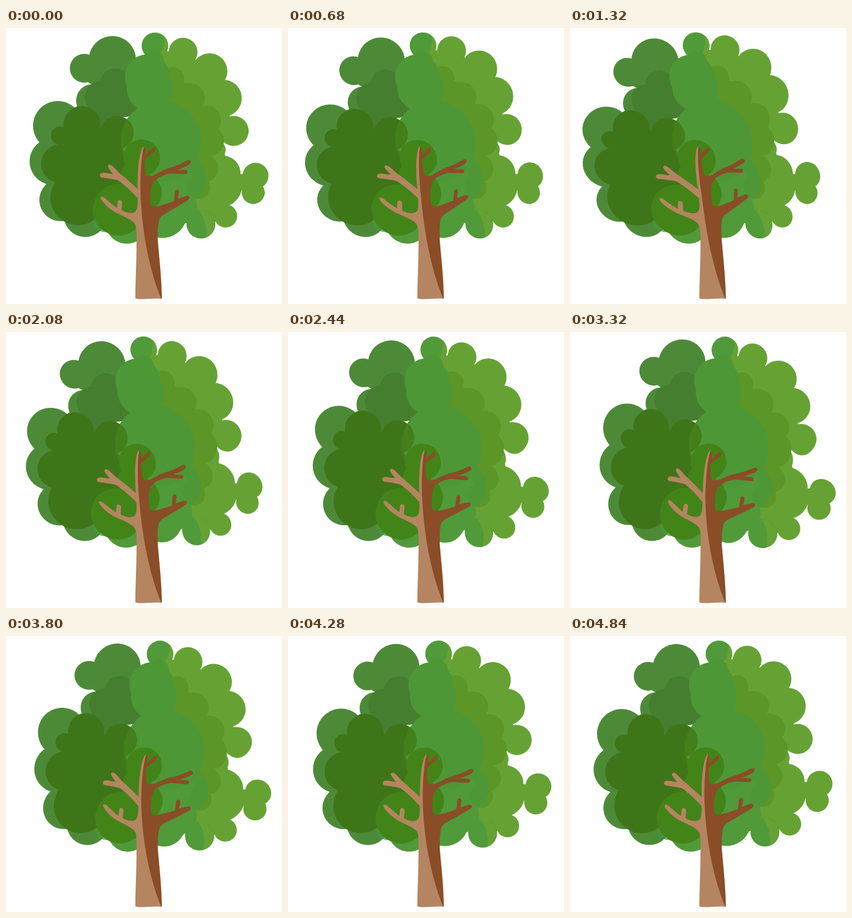
Recreate the animation shown at these times as an HTML page. Size 480 by 480 pixels, loop 4.96 s.

```html
<!DOCTYPE html>
<html lang="en">
<head>
<meta charset="utf-8">
<title>Swaying tree</title>
<style>
html, body { margin: 0; width: 100%; height: 100%; overflow: hidden; background: #fff; }
svg { display: block; width: 100%; height: 100%; }
</style>
</head>
<body>
<svg id="stage" viewBox="0 0 480 480">
  <defs><clipPath id="heart"><path id="heartShape"/></clipPath></defs>
</svg>
<script>
const LOOP = 4960, STEP = 40, LAST = 4840;
const SVG = 'http://www.w3.org/2000/svg';
const stage = document.getElementById('stage');
const heartShape = document.getElementById('heartShape');

const clamp = v => Math.max(0, Math.min(1, v));
const ease = (t, a, b) => 0.5 - 0.5 * Math.cos(Math.PI * clamp((t - a) / (b - a)));

// Leaf clusters: circles as [x, y, radius]
const heart = [[269, 197, 70]];
const core = [[246, 85, 39], [250, 105, 40], ...heart];
const centre = [
  [259, 31, 23], ...core, [305, 262, 43], [300, 310, 32], [272, 322, 43],
  [210, 338, 37], [339, 341, 25], [172, 335, 20], [240, 300, 50]
];
const right = [
  [308, 42, 25], [354, 75, 31], [378, 122, 32], [396, 179, 26], [366, 212, 16],
  [377, 253, 31], [372, 273, 39], [434, 257, 22.5], [430, 286, 20], [382, 327, 20],
  [410, 268, 14], [330, 100, 45], [340, 160, 50], [340, 230, 42], [348, 300, 40],
  [280, 70, 30], ...centre.slice(0, -3), [339, 341, 25]
];
const left = [
  [185, 55, 41], [136, 70, 25], [156, 78, 21], [150, 126, 28], [90, 170, 43],
  [82, 232, 41], [95, 299, 37], [138, 326, 37.5], [190, 110, 40], [150, 190, 60],
  [130, 270, 60], [180, 300, 50]
];
const leftShade = [[190, 96, 26], [165, 120, 28], [205, 125, 30], [172, 150, 32]];
const rightShade = [
  [257, 58, 18], [290, 88, 20], [320, 122, 26], [348, 161, 26], [353, 197, 26],
  [345, 244, 24], [335, 277, 20], [300, 130, 36], [320, 210, 36], ...core
];
const dark = [
  [132, 168, 32], [94, 187, 16], [95, 236, 34], [125, 295, 48], [193, 182, 29],
  [150, 225, 55], [165, 240, 48], [165, 285, 40]
];
const glow = [[236, 226, 32], [225, 256, 25], [237, 287, 34], [196, 316, 45]];

// Light slivers, bark and shaded bark
const topEdge = 'M275 14C285 24 284 40 274 50L268 45C274 36 276 26 275 14Z';
const lowEdge = 'M334 317C344 325 350 345 348 364C362 358 368 338 358 325L345 316Z';
const bark = 'M241 206C235 203 228 235 229 280C218 270 207 260 196 251C191 246 187 241 182 238' +
  'C178 237 176 240 178 243C181 248 184 251 186 254C180 254 173 251 167 252C162 253 162 259 167 260' +
  'C176 261 187 263 195 265C208 274 218 284 229 296C229 306 229 314 226 318C222 324 210 322 201 317' +
  'L202 303C201 298 194 298 194 303L193 313C184 307 178 301 171 295C166 291 163 294 166 299' +
  'C173 309 181 315 191 321C203 327 216 332 223 339C228 346 227 355 227 370C227 410 225 440 225 470' +
  'C235 474 250 469 271 471C255 420 240 330 236 270C236 240 240 225 241 206Z';
const shade = 'M240 206C244 206 243 213 242 221L253 210C257 206 262 210 258 215L241 229' +
  'C241 245 241 258 247 258C255 260 268 248 285 243C297 240 308 234 316 230C322 229 323 234 319 237' +
  'C312 242 304 244 298 247L312 247C317 248 317 253 312 254L285 253C270 257 258 262 253 274' +
  'C251 285 249 298 252 309C258 313 272 308 292 301L294 285C295 280 302 280 301 286L299 297' +
  'L314 292C320 291 321 296 317 299C300 310 285 318 272 326C264 332 264 345 264 370' +
  'C267 405 271 440 271 470L270 471C245 410 236 340 234 290C233 250 236 220 240 206Z';

// sway: lean to the left; droop: delayed sag of the right side
function pose(t) {
  return {
    sway: ease(t, 0, 1200) - 1.26 * ease(t, 1200, 3200) + 0.26 * ease(t, 3500, 4700),
    droop: ease(t, 1320, 2840) - ease(t, 3300, 4700)
  };
}

function bendLeaf(x, y, { sway, droop }) {
  const r = Math.max(0, x - 260);
  const inner = 7 * Math.exp(-((x - 250) ** 2 + (y - 270) ** 2) / 5000);
  const lean = 0.105 * Math.max(0, 412 - y) + 0.05 * r * clamp((y - 150) / 200) - inner;
  const tilt = x < 255
    ? 0.06 * (255 - x) * clamp((360 - y) / 220)
    : -0.08 * (x - 255) * clamp((255 - y) / 200);
  const sag = r * (0.04 + 0.08 * ease(y, 190, 230));
  const push = 5.5 * clamp((255 - x) / 200) * clamp((y - 60) / 150)
    - 0.09 * Math.max(0, y - 265) * clamp(r / 60);
  return [x - sway * lean + droop * push, y + sway * tilt + droop * sag];
}

function bendWood(x, y, { sway, droop }) {
  const free = clamp((365 - y) / 60);
  const out = Math.max(0, Math.abs(x - 240) - 8);
  const lean = 17 * Math.pow(Math.max(0, 365 - y) / 159, 1.6) + 0.07 * out * free;
  const push = 3 * clamp((235 - x) / 60) * free;
  const sag = 0.08 * Math.max(0, x - 250) * free;
  return [x - sway * lean + droop * push, y - sway * 0.035 * (x - 240) * free + droop * sag];
}

const show = p => p[0].toFixed(2) + ' ' + p[1].toFixed(2);

function blobs(list, p) {
  return list.map(([x, y, r]) => {
    const pts = [];
    for (let i = 0; i < 40; i++) {
      const a = i * Math.PI / 20;
      pts.push(show(bendLeaf(x + r * Math.cos(a), y + r * Math.sin(a), p)));
    }
    return 'M' + pts.join('L') + 'Z';
  }).join('');
}

const warp = (d, bend, p) =>
  d.replace(/(\d+) (\d+)/g, (_, x, y) => show(bend(+x, +y, p)) + ' ');

function layer(fill, draw, attrs = {}) {
  const node = document.createElementNS(SVG, 'path');
  node.setAttribute('fill', fill);
  for (const name in attrs) node.setAttribute(name, attrs[name]);
  stage.appendChild(node);
  return { node, draw };
}
const leaves = list => p => blobs(list, p);

const layers = [
  layer('#65a233', leaves(right)),
  layer('#4d8a38', leaves(left)),
  layer('#467e2f', leaves(leftShade)),
  layer('#5b9627', leaves(rightShade)),
  layer('#48973e', leaves(centre), { 'fill-opacity': 0.72 }),
  layer('#65a233', p => warp(topEdge, bendLeaf, p)),
  layer('#65a233', p => warp(lowEdge, bendLeaf, p)),
  layer('#3f7519', leaves(dark)),
  layer('#437f1a', leaves(dark), { 'clip-path': 'url(#heart)' }),
  layer('#438418', leaves(glow)),
  layer('#b48560', p => warp(bark, bendWood, p)),
  layer('#8a4d27', p => warp(shade, bendWood, p))
];

function render(t) {
  const p = pose(t);
  heartShape.setAttribute('d', blobs(heart, p));
  for (const { node, draw } of layers) node.setAttribute('d', draw(p));
}

const start = performance.now();
function tick() {
  const t = (performance.now() - start) % LOOP;
  render(Math.min(LAST, Math.floor(t / STEP) * STEP));
  requestAnimationFrame(tick);
}
render(0);
requestAnimationFrame(tick);
</script>
</body>
</html>
```
